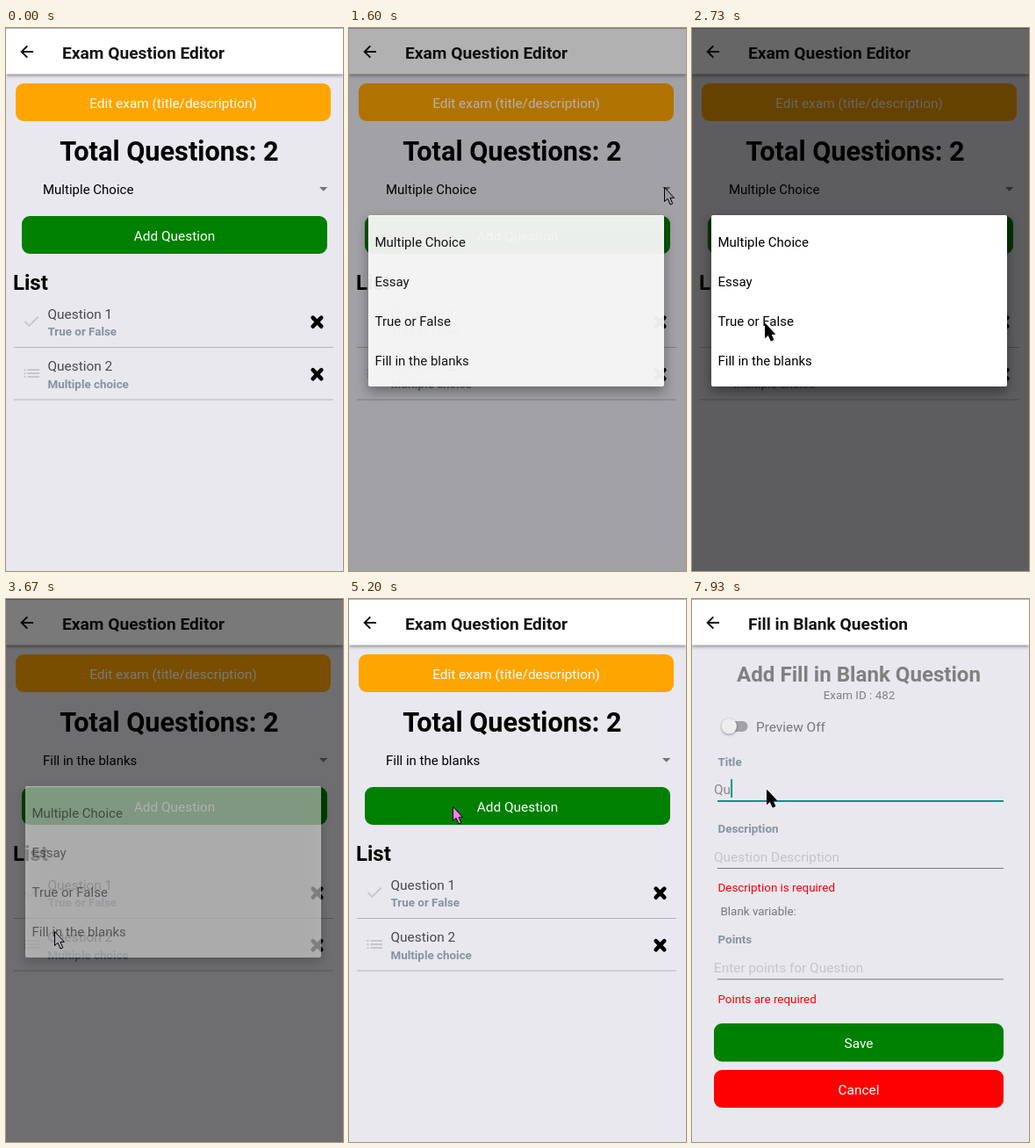
An HTML page with a canvas that plays this animation: 384x618 px, repeating every 8000 ms.

```html
<!DOCTYPE html>
<html lang="en">
<head>
<meta charset="utf-8">
<title>Exam Question Editor</title>
<style>
  html, body { margin: 0; width: 100%; height: 100%; overflow: hidden; background: #e9e8ee; }
  canvas { display: block; width: 384px; height: 618px; }
</style>
</head>
<body>
<canvas id="stage"></canvas>
<script>
const W = 384, H = 618, LOOP = 8000, STEP = 1000 / 15;
const canvas = document.getElementById('stage');
const ctx = canvas.getContext('2d');
const ratio = window.devicePixelRatio || 1;
canvas.width = W * ratio;
canvas.height = H * ratio;

const BACK = '#e9e8ee', GREEN = '#008000', TEAL = '#009688', LABEL = '#8593a0', PALE = '#c6c6cb';
const CHOICES = ['Multiple Choice', 'Essay', 'True or False', 'Fill in the blanks'];

// Pointer path: time, x, y
const PATH = [
  [333, 379, 205], [800, 359, 181], [1667, 359, 181], [2333, 182, 238], [2733, 83, 336],
  [3267, 55, 378], [4067, 55, 378], [4467, 118, 236], [5867, 118, 236], [6000, 115, 233],
  [6067, 100, 228], [6267, 85, 217]
];
// Pointer presses: start, end, fill
const PRESSES = [
  [1533, 1667, '#99989c'], [3600, 3867, '#a9a8ac'], [5200, 5333, '#ff80f4'], [6667, 6800, '#ff80f4']
];

const clamp = v => Math.max(0, Math.min(1, v));
const progress = (t, from, to) => clamp((t - from) / (to - from));

function text(str, x, y, size, color, { bold = false, align = 'left' } = {}) {
  ctx.font = `${bold ? 700 : 400} ${size}px Roboto, sans-serif`;
  ctx.textAlign = align;
  ctx.fillStyle = color;
  ctx.fillText(str, x, y);
}

function rect(x, y, w, h, color, radius = 0) {
  ctx.fillStyle = color;
  ctx.beginPath();
  ctx.roundRect(x, y, w, h, radius);
  ctx.fill();
}

function line(points, color, width) {
  ctx.strokeStyle = color;
  ctx.lineWidth = width;
  ctx.beginPath();
  points.forEach(([x, y]) => ctx.lineTo(x, y));
  ctx.stroke();
}

function polygon(points, color) {
  ctx.fillStyle = color;
  ctx.beginPath();
  points.forEach(([x, y]) => ctx.lineTo(x, y));
  ctx.closePath();
  ctx.fill();
}

function withShadow(color, blur, dy, draw) {
  ctx.save();
  ctx.shadowColor = color;
  ctx.shadowBlur = blur * ratio;
  ctx.shadowOffsetY = dy * ratio;
  draw();
  ctx.restore();
}

function button(label, x, y, w, h, color) {
  rect(x, y, w, h, color, 9);
  text(label, x + w / 2, y + h / 2 + 6, 15.4, '#fff', { align: 'center' });
}

function page(title) {
  rect(0, 0, W, H, BACK);
  withShadow('rgba(0,0,0,.45)', 4, 1, () => rect(0, 0, W, 52.5, '#fff'));
  rect(0, 0, W, 1, '#b4b4b4');
  line([[31, 27], [18, 27]], '#111', 2);
  line([[24.3, 20.4], [17.7, 27], [24.3, 33.6]], '#111', 2);
  text(title, 64, 34.5, 19.2, '#141414', { bold: true });
}

function listItem(title, kind, y) {
  text(title, 47.5, y + 5.5, 15.4, '#48484c');
  text(kind, 47.5, y + 25, 13.4, LABEL, { bold: true });
  line([[9, y + 38.5], [373, y + 38.5]], '#b4b4b8', 1);
  const cy = y + 9.7;
  ctx.lineCap = 'round';
  line([[349.7, cy - 5], [359.3, cy + 5]], '#000', 4.6);
  line([[359.3, cy - 5], [349.7, cy + 5]], '#000', 4.6);
  ctx.lineCap = 'butt';
}

function editor(choice) {
  page('Exam Question Editor');
  button('Edit exam (title/description)', 11, 63, 359, 43, '#ffa500');
  text('Total Questions: 2', 186, 150.5, 30.7, '#000', { bold: true, align: 'center' });
  text(choice, 42, 188.5, 15, '#000');
  polygon([[357, 181], [366.4, 181], [361.7, 185.7]], '#747478');
  button('Add Question', 18, 214, 348, 43, GREEN);
  text('List', 8, 298, 24, '#000', { bold: true });
  listItem('Question 1', 'True or False', 325);
  listItem('Question 2', 'Multiple choice', 384.5);
  line([[21.5, 334], [26.3, 339], [36.8, 328.5]], PALE, 1.9);
  for (const y of [388, 392, 396]) {
    rect(20.5, y, 2, 2, PALE);
    rect(24.5, y, 13.5, 2, PALE);
  }
}

function popup(alpha) {
  if (alpha <= 0) return;
  ctx.save();
  ctx.globalAlpha = alpha;
  withShadow('rgba(0,0,0,.4)', 14, 6, () => rect(22, 213, 337, 195, '#fff', 2));
  CHOICES.forEach((choice, i) => text(choice, 29.5, 248.7 + i * 45.2, 15, '#000'));
  ctx.restore();
}

function field(label, placeholder, y) {
  text(label, 29.5, y, 13.4, LABEL, { bold: true });
  text(placeholder, 25, y + 32.7, 15.4, '#c4c4c9');
  line([[29, y + 40.5], [355, y + 40.5]], '#77777b', 1);
}

function error(message, y) {
  text(message, 29.5, y, 13.4, '#f00');
}

function form(t) {
  const typed = t >= 7930 ? 'Qu' : t >= 7465 ? 'Q' : '';
  const focused = t >= 6665;
  const caretOn = focused && !(t >= 7130 && t < 7465);

  page('Fill in Blank Question');
  text('Add Fill in Blank Question', 190, 93.5, 24.1, '#808080', { bold: true, align: 'center' });
  text('Exam ID : 482', 190.5, 114.3, 13.4, '#808080', { align: 'center' });

  rect(36, 139, 27.5, 12, '#a3a2a6', 6);
  withShadow('rgba(0,0,0,.4)', 3, 1, () => rect(33.5, 136, 17.5, 17.5, '#efeeee', 8.75));
  text('Preview Off', 73, 150.5, 15.4, '#77777a');

  field('Title', typed ? '' : 'Question title', 189.5);
  if (focused) rect(29, 229, 326, 2, TEAL);
  text(typed, 25, 222.2, 15.4, '#8a8a8e');
  if (caretOn) rect(25 + ctx.measureText(typed).width, 205, 2, 21, TEAL);
  if (!typed) error('Title is required', 257);

  ctx.save();
  ctx.translate(0, typed ? -24 : 0);
  field('Description', 'Question Description', 290);
  error('Description is required', 357);
  text('Blank variable:', 32.5, 384, 13.4, '#77777a');
  field('Points', 'Enter points for Question', 416.3);
  error('Points are required', 483.7);
  button('Save', 25, 507, 330, 43.5, GREEN);
  button('Cancel', 25, 560, 330, 43, '#f00');
  ctx.restore();
}

function pointer(t) {
  if (t < PATH[0][0] - 1) return;
  const next = PATH.findIndex(([time]) => time > t);
  let [, x, y] = PATH.at(-1);
  if (next > 0) {
    const [t0, x0, y0] = PATH[next - 1], [t1, x1, y1] = PATH[next];
    const p = (t - t0) / (t1 - t0);
    x = x0 + (x1 - x0) * p;
    y = y0 + (y1 - y0) * p;
  } else if (next === 0) {
    [, x, y] = PATH[0];
  }
  const press = PRESSES.find(([from, to]) => t >= from - 2 && t < to - 2);
  ctx.save();
  ctx.translate(x, y);
  const arrow = [[.5, .5], [.5, 16.5], [4, 13.3], [7, 20], [9.8, 18.8], [7, 12.3], [11.5, 12.3]];
  polygon(arrow, press ? press[2] : '#000');
  line([...arrow, arrow[0]], '#000', 1);
  ctx.restore();
}

function draw(t) {
  ctx.setTransform(ratio, 0, 0, ratio, 0, 0);
  const opening = progress(t, 5460, 5800);

  if (opening < 1) {
    editor(t < 3660 ? CHOICES[0] : CHOICES[3]);
    const dim = .6 * (progress(t, 1497, 1700) - progress(t, 3642, 3842));
    rect(0, 0, W, H, `rgba(0,0,0,${dim})`);
    popup(progress(t, 1460, 1612) - progress(t, 3600, 3733));
  }
  if (opening > 0) {
    const eased = 1 - (1 - opening) ** 3;
    ctx.save();
    ctx.globalAlpha = eased;
    ctx.translate(0, (1 - eased) * H * .08);
    form(t);
    ctx.restore();
  }
  pointer(t);
}

const start = performance.now();
function tick() {
  const t = (performance.now() - start) % LOOP;
  draw(Math.floor((t + 4) / STEP) * STEP);
  requestAnimationFrame(tick);
}
tick();
</script>
</body>
</html>
```
